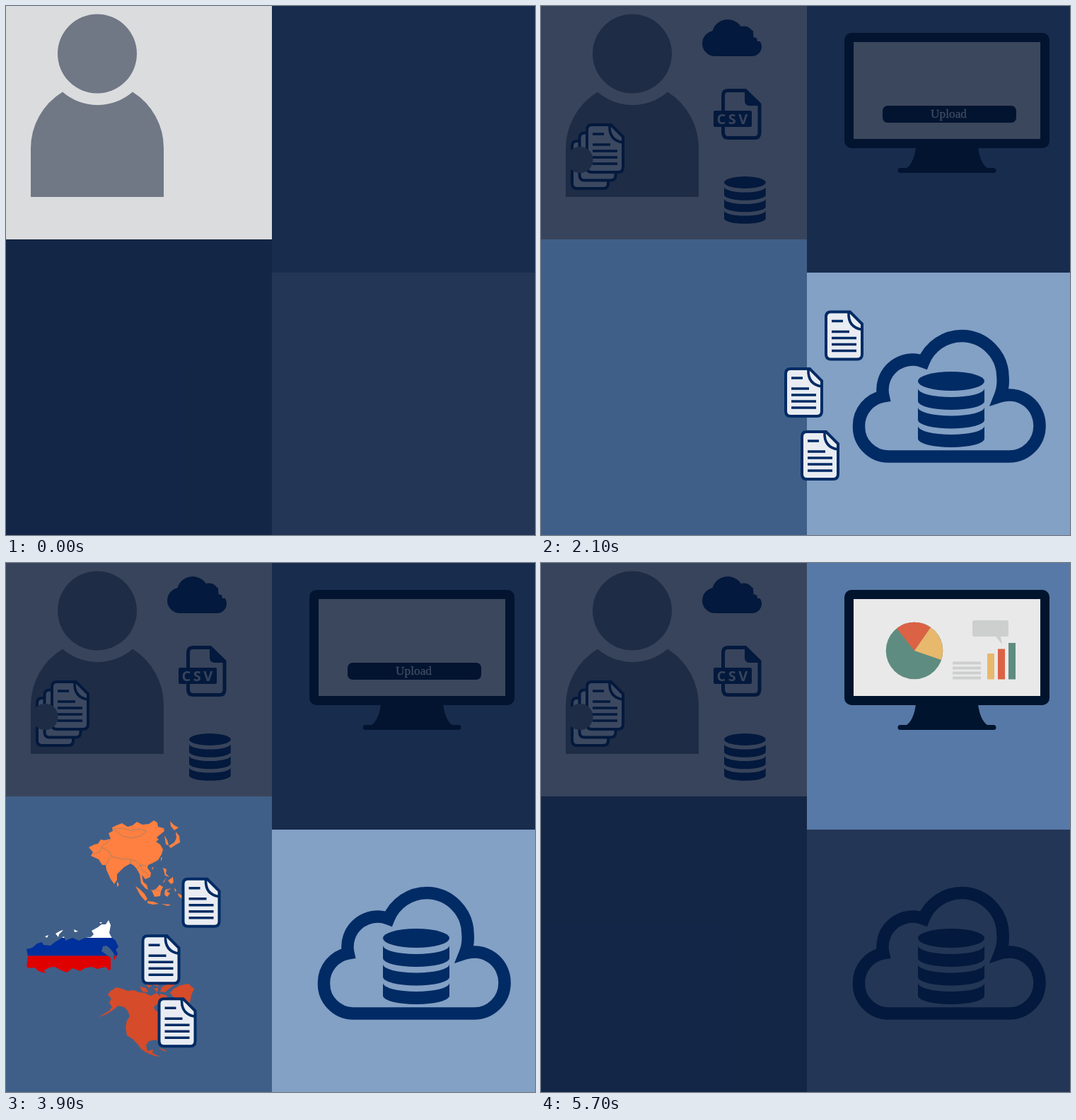
Animation, 748 px wide and 748 px high, one loop 5.9 s. Source, as an HTML page:

```html
<!DOCTYPE html>
<html lang="en">
<head>
<meta charset="utf-8">
<title>Upload, distribute, report</title>
<style>
  html, body { margin: 0; width: 100%; height: 100%; overflow: hidden; background: #122746; }
  svg { display: block; width: 100vw; height: 100vh; }
  .navy { fill: #002b64; }
  .dark { fill: #00142e; }
  .person { fill: #707785; }
  .shade { fill: rgb(4, 20, 50); fill-opacity: .757; }
</style>
</head>
<body>
<svg viewBox="0 0 748 748">
  <defs>
    <path id="sheet" d="M9 2H36L53 19V62Q53 69 46 69H9Q2 69 2 62V9Q2 2 9 2Z"
      fill="#e9ecf2" stroke="#002b64" stroke-width="4"/>
    <g id="doc">
      <use href="#sheet"/>
      <path d="M34 3Q33 24 53 27M10 15H26M10 30H35M10 39H45M10 48H45M10 57H45"
        fill="none" stroke="#002b64" stroke-width="3.6"/>
    </g>
    <g id="stack">
      <use href="#sheet" y="23"/>
      <use href="#sheet" x="10.5" y="11.5"/>
      <use href="#doc" x="21"/>
    </g>
    <g id="database" class="navy">
      <ellipse cx="47" cy="13.5" rx="47" ry="13.5"/>
      <path id="band" d="M0 24A47 12 0 0 0 94 24V42A47 12 0 0 1 0 42Z"/>
      <use href="#band" y="26.5"/>
      <use href="#band" y="53"/>
    </g>
    <clipPath id="northLand">
      <path d="M29 571L31 556 29 546 37 544 44 538 51 536 53 540 63 541 69 536 76 532 82 528 84 534 94 530
        103 534 112 530 120 529 124 525 121 520 130 515 135 511 141 511 145 505 148 512 146 523 149 529
        155 534 159 543 155 547 158 552 156 558 151 550 147 545 142 541 137 542 135 549 141 553 148 558
        148 575 145 576 141 571 129 574 121 571 111 573 105 577 94 573 86 579 78 576 69 571 61 572 54 576
        56 580 46 577 40 572 33 573Z
        M55 528L60 526 58 530ZM74 529L70 524 77 520 81 519 75 525ZM96 518L102 521 97 522ZM132 508L136 508 134 510Z
        M152 553L155 558 153 562Z"/>
    </clipPath>
  </defs>

  <!-- top left: sources -->
  <rect width="376" height="330" fill="#dbdcdd"/>
  <g class="person">
    <circle cx="129" cy="67.5" r="56"/>
    <path d="M35 270V202A94 94 0 0 1 80 121.500A75.500 75.500 0 0 0 179 121.500A94 94 0 0 1 223 202V270Z"/>
  </g>
  <use id="ownStack" href="#stack" x="42" y="166"/>
  <rect id="hand" class="person" x="37" y="199" width="36.500" height="37" rx="18"/>
  <g id="icons" class="navy">
    <path d="M246 35H300V71H246Z"/>
    <circle cx="246" cy="53" r="18"/>
    <circle cx="264" cy="41.500" r="22.500"/>
    <circle cx="287" cy="42" r="13.500"/>
    <circle cx="298.500" cy="57.500" r="13.500"/>
    <path d="M302 30L318 30V50H306Z" fill="#dbdcdd"/>
    <path d="M264 119.500H289L309 139V179Q309 186.500 302 186.500H265Q257.500 186.500 257.500 179V127Q257.500 119.500 264 119.500Z"
      fill="none" stroke="#002b64" stroke-width="5"/>
    <path d="M288 119L311 141H295Q288 141 288 134Z"/>
    <rect x="244" y="148" width="54" height="23" rx="2"/>
    <text x="248.500" y="167" font-family="'Open Sans', sans-serif" font-weight="700" font-size="20"
      letter-spacing="3.500" fill="#dbdcdd">CSV</text>
    <use href="#database" transform="translate(259 241) scale(.625)"/>
  </g>
  <rect id="shadeSources" class="shade" width="376" height="330"/>

  <!-- top right: screen -->
  <rect x="376" width="372" height="377" fill="#5779a7"/>
  <g id="monitor">
    <g class="dark">
      <rect x="429" y="38" width="290" height="163" rx="10"/>
      <path d="M530 200Q527 222 517 229H508Q504.500 229 504.500 232.500T508 236H640Q643.500 236 643.500 232.500T640 229H631Q621 222 618 200Z"/>
    </g>
    <rect x="442" y="51" width="264" height="137" fill="#e9e9e9"/>
    <g id="button">
      <rect class="dark" x="483" y="141" width="189" height="24" rx="7"/>
      <text x="576.500" y="158" text-anchor="middle" font-family="'Liberation Serif', serif" font-size="17.300"
        fill="#f2f4f8" stroke="#f2f4f8" stroke-width=".3">Upload</text>
    </g>
    <g id="chart">
      <circle cx="528" cy="124" r="40.300" fill="#5f8c80"/>
      <path d="M528 124L503 92.500A40.300 40.300 0 0 1 551 91Z" fill="#db6245"/>
      <path d="M528 124L551 91A40.300 40.300 0 0 1 566 137Z" fill="#e8b86c"/>
      <path d="M582 141.500H622M582 148.500H622M582 155.500H622M582 162.500H622" stroke="#cdcfcf" stroke-width="3.800"/>
      <path d="M613 81H658Q661 81 661 84V101Q661 104 658 104H650L652 115 643 104H613Q610 104 610 101V84Q610 81 613 81Z" fill="#cdcfcf"/>
      <path d="M631 128H641V164.500H631Z" fill="#e8b86c"/>
      <path d="M646 121.500H656V164.500H646Z" fill="#db6245"/>
      <path d="M661 113H671V164.500H661Z" fill="#5f8c80"/>
    </g>
  </g>
  <rect id="shadeScreen" class="shade" x="376" width="372" height="377"/>

  <!-- bottom right: cloud storage -->
  <rect x="376" y="377" width="372" height="371" fill="#83a0c5"/>
  <g id="storage">
    <path d="M491 637A42 42 0 0 1 449.500 594A42 42 0 0 1 484 552A42.500 42.500 0 0 1 541 503A58.500 58.500 0 0 1 595 466.500
      A58.500 58.500 0 0 1 653 525A58.500 58.500 0 0 1 649 552A43 43 0 0 1 705 594A43 43 0 0 1 662 637Z"
      fill="none" stroke="#002b64" stroke-width="17.500"/>
    <use href="#database" x="533" y="517"/>
  </g>
  <rect id="shadeStorage" class="shade" x="376" y="377" width="372" height="371"/>

  <!-- bottom left: regions -->
  <rect y="330" width="376" height="418" fill="#405f88"/>
  <g id="maps">
    <g fill="#ff8040">
      <path d="M117 402L125 398 130 397 134 391 139 392 148 390 145 382 151 379 150 374 156 371 164 368 172 373 179 371
        185 366 193 370 202 369 209 364 214 367 215 373 223 375 224 379 218 384 213 388 216 391 212 394 218 398 222 405
        220 412 215 420 208 424 201 427 200 431 205 438 204 444 197 447 192 441 194 451 199 455 201 462 197 460 191 453
        189 440 185 433 181 428 176 425 167 430 157 440 157 448 153 454 148 447 142 434 141 427 136 427 131 419 120 414 123 409Z"/>
      <path d="M224 385L228 392 230 399 226 398ZM232 365L238 371 244 374 238 378 233 372ZM240 380L245 386 246 395 239 399 233 403
        230 400 238 395 241 389ZM219 416L221 417 219 422ZM206 431L209 430 207 434ZM157 450L160 455 157 458Z"/>
      <path d="M183 457L189 461 196 468 200 475 197 478 190 470ZM200 478L209 479 216 482 208 483 200 481ZM206 463L212 461 217 455
        222 458 219 464 218 471 210 472ZM225 462L234 460 227 464 232 467 228 472 224 469ZM222 431L227 433 226 439 231 444 225 442Z
        M229 449L236 444 237 452 233 454ZM222 451L227 445 223 452ZM238 459L241 463 239 465ZM219 482L233 483 229 485ZM243 467L249 470 254 468 261 470V483
        L255 479 250 476 244 471Z"/>
      <path d="M152 376L164 375 176 378 188 376 199 379 190 386 177 389 164 386ZM148 390L135 402 146 408 149 415 161 418 175 419
        183 421 190 427 198 428M135 402L133 408 123 412M142 427L145 419 148 416M176 425L177 419M185 433L190 427 193 435 198 437 201 443M204 463L218 463"
        fill="none" stroke="#9a806c" stroke-width=".8"/>
    </g>
    <g clip-path="url(#northLand)">
      <path d="M29 500H160V530H29Z" fill="#fff"/>
      <path d="M29 530H160V555.500H29Z" fill="#00309c"/>
      <path d="M29 555.500H160V582H29Z" fill="#df0000"/>
    </g>
    <g fill="#d64b2a">
      <path d="M148 605L156 600 164 602 172 605 181 604 188 607 197 608 204 612 213 608 219 614 220 619 214 622 209 628 211 633
        217 635 218 642 222 637 220 628 226 625 230 630 235 632 239 641 234 646 241 648 242 653 236 654 230 656 226 661 221 667
        217 672 220 681 215 677 212 674 202 676 198 682 200 690 208 688 207 693 213 696 220 698 210 697 198 692 191 687 186 680
        179 673 171 668 169 656 171 647 175 641 172 633 167 628 159 626 150 633 142 638 130 642 145 634 150 628 146 622 149 616 144 610Z"/>
      <path d="M237 602L247 597 258 595 266 602 262 611 260 622 250 631 243 636 240 643 235 636 234 625 238 615 232 608Z
        M189 599L198 601 201 607 193 606ZM198 596L206 597 202 601ZM209 602L215 600 214 607ZM218 609L226 611 232 618 236 623 231 626
        223 619 217 616ZM220 600L231 594 239 596 229 603 225 607 218 606ZM207 596L214 595 216 599ZM211 620L216 620 218 625 213 625ZM240 648L246 651 243 654Z
        M216 686L224 688 228 691 221 689Z"/>
    </g>
  </g>
  <rect id="shadeRegions" class="shade" y="330" width="376" height="418"/>

  <g id="clock">
    <circle cx="302" cy="380" r="32.300" fill="#fff"/>
    <circle cx="302" cy="380" r="29.700" fill="none" stroke="#222" stroke-width="2" stroke-dasharray=".8 2.310"/>
    <path d="M302 381V352A28 28 0 0 1 311 353.500Z" fill="#f00"/>
    <g font-family="'Liberation Sans', sans-serif" fill="#111">
      <text x="276" y="397.500" font-size="44">3</text>
      <text x="299.500" y="397.500" font-size="12.500" font-weight="700">min</text>
    </g>
  </g>
  <use id="movingStack" href="#stack" x="539" y="362"/>
  <g id="copies">
    <use href="#doc" x="401" y="430.500"/>
    <use href="#doc" x="344" y="511"/>
    <use href="#doc" x="367" y="600"/>
  </g>
</svg>
<script>
  const LOOP = 5900, STEP = 100;
  const el = id => document.getElementById(id);
  const show = (id, on) => { el(id).style.display = on ? '' : 'none'; };
  const move = (id, x, y) => el(id).setAttribute('transform', `translate(${x} ${y})`);

  // Visible spans, counted in steps: [from, to) pairs
  const spans = {
    ownStack: [[2, 59]], icons: [[5, 59]], hand: [[8, 59]],
    monitor: [[8, 59]], button: [[8, 57]], chart: [[57, 59]], storage: [[12, 59]],
    maps: [[23, 44]], clock: [[30, 37]],
    movingStack: [[12, 18], [49, 57]],
    copies: [[18, 30], [37, 49]],
    shadeSources: [[12, 59]],
    shadeScreen: [[0, 8], [18, 49]],
    shadeStorage: [[0, 12], [57, 59]],
    shadeRegions: [[0, 18], [49, 59]]
  };

  function draw() {
    const s = Math.floor(performance.now() % LOOP / STEP);
    for (const id in spans) show(id, spans[id].some(([from, to]) => s >= from && s < to));

    move('movingStack', 0, 50 * (s < 30 ? s - 16 : 51 - s));

    // The copies pause at the cloud's edge on the way out and back
    const k = s < 34
      ? Math.min(s - 21, 0) + Math.max(s - 22, 0)
      : Math.max(44 - s, 0) + Math.min(45 - s, 0);
    move('copies', -30.5 * k, 20 / 7 * k);
    requestAnimationFrame(draw);
  }
  draw();
</script>
</body>
</html>
```
